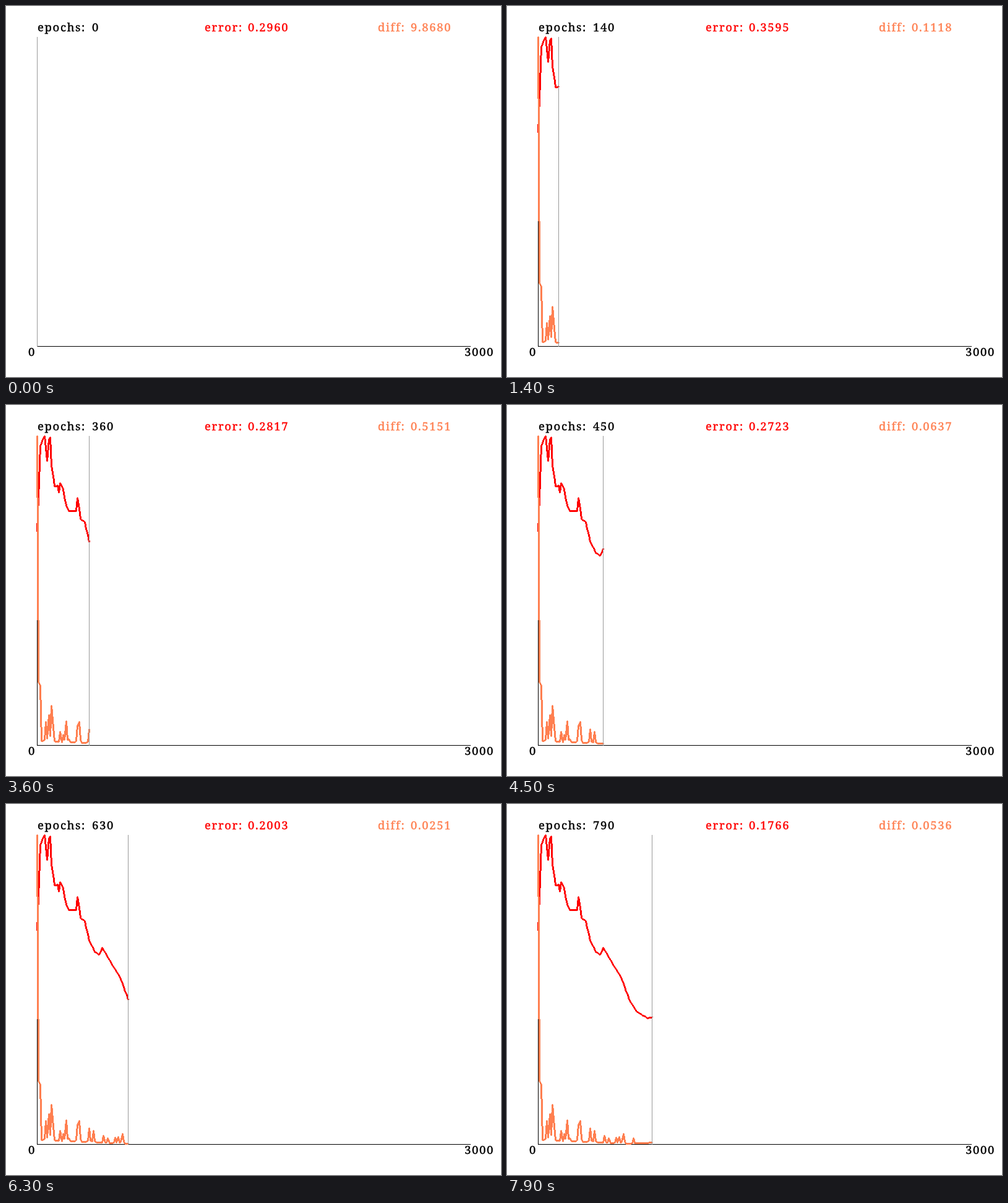
These frames come from a looping animation (800 by 600 pixels, 8000 ms). An HTML page with a canvas:

```html
<!DOCTYPE html>
<html lang="en">
<head>
<meta charset="utf-8">
<title>Training error</title>
<style>
  html, body { margin: 0; width: 100%; height: 100%; overflow: hidden; background: #fff; }
  canvas { display: block; }
</style>
</head>
<body>
<canvas id="stage" width="800" height="600"></canvas>
<script>
const ctx = document.getElementById('stage').getContext('2d');
const LOOP = 8000, STEP = 100, EPOCHS = 3000;
const LEFT = 50, TOP = 50, W = 700, H = 500, BASE = TOP + H;
const RED = '#ff0000', CORAL = '#ff7f50', BLACK = '#000', GRAY = '#999';

// turning points as [step, value]; one step is ten epochs
const errorKeys = [
  [0, .296], [1, .3433], [2, .4145], [5, .4281], [7, .3938], [8, .4238], [9, .4264],
  [10, .387], [12, .3587], [14, .3595], [15, .3502], [16, .363], [18, .3545], [20, .3322],
  [22, .3242], [27, .3245], [28, .3425], [30, .3134], [33, .3091], [36, .2817],
  [40, .2663], [43, .2628], [45, .2723], [54, .2419], [58, .2286], [63, .2003],
  [68, .1841], [76, .1745], [79, .1766]
];
const floorKeys = [[0, 9.868], [1, 2.033], [2, 1.895], [3, .13], [14, .1118], [63, .0251], [79, .0536]];
const spikes = [
  [6, .75], [8, .967], [10, 1.263], [11, .57], [16, .434], [18, .336], [20, .77], [22, .1997],
  [28, .63], [29, .75], [36, .5151], [39, .434], [46, .276], [49, .197], [54, .2193],
  [56, .237], [59, .336], [66, .2]
];

function lerpKeys(keys, i) {
  const n = Math.max(1, keys.findIndex(k => k[0] >= i));
  const [a, va] = keys[n - 1], [b, vb] = keys[n];
  return va + (vb - va) * (i - a) / (b - a);
}

const errorAt = i => lerpKeys(errorKeys, i);
const diffAt = i => Math.max(lerpKeys(floorKeys, i),
  ...spikes.map(([at, height]) => height * (1 - Math.abs(i - at) / 1.3)));

const steps = [...Array(LOOP / STEP).keys()];
const errors = steps.map(errorAt);
const diffs = steps.map(diffAt);

const xAt = i => Math.round(LEFT + i * 10 * W / EPOCHS);

function rect(color, x, y, w, h) {
  ctx.fillStyle = color;
  ctx.fillRect(x, y, w, h);
}

function text(str, x, y, color) {
  ctx.fillStyle = ctx.strokeStyle = color;
  ctx.fillText(str, x, y);
  ctx.strokeText(str, x, y);
}

// hard-edged line, three pixels thick
function line(x0, y0, x1, y1) {
  const n = Math.max(Math.abs(x1 - x0), Math.abs(y1 - y0), 1);
  for (let k = 0; k <= n; k++) {
    const x = Math.round(x0 + (x1 - x0) * k / n);
    const y = Math.round(y0 + (y1 - y0) * k / n);
    ctx.fillRect(x - 1, y, 3, 1);
    ctx.fillRect(x, y - 1, 1, 3);
  }
}

function plot(data, last, color) {
  const max = Math.max(...data);
  const yAt = i => Math.round(BASE - H * data[i] / max);
  ctx.fillStyle = color;
  for (let i = 1; i <= last; i++) line(xAt(i - 1), yAt(i - 1), xAt(i), yAt(i));
}

function draw(step) {
  rect('#fff', 0, 0, 800, 600);
  rect(BLACK, LEFT, TOP, 1, H + 1);
  rect(BLACK, LEFT, BASE, W + 1, 1);

  plot(errors, step, RED);
  plot(diffs, step, CORAL);
  rect(GRAY, xAt(step), TOP, 1, H + 1);

  ctx.font = '18.5px "Noto Serif", "Liberation Serif", serif';
  ctx.letterSpacing = '1.65px';
  ctx.lineWidth = 0.4;
  text('epochs:', 51, 41, BLACK);
  text(step * 10, 139, 41, BLACK);
  text('error:', 321, 41, RED);
  text(errors[step].toFixed(4), 391, 41, RED);
  text('diff:', 601, 41, CORAL);
  text(diffs[step].toFixed(4), 654, 41, CORAL);
  text('0', 36, 566, BLACK);
  text(EPOCHS, 741, 566, BLACK);
}

const start = performance.now();
function tick() {
  draw(Math.floor((performance.now() - start) % LOOP / STEP));
  requestAnimationFrame(tick);
}
tick();
</script>
</body>
</html>
```
